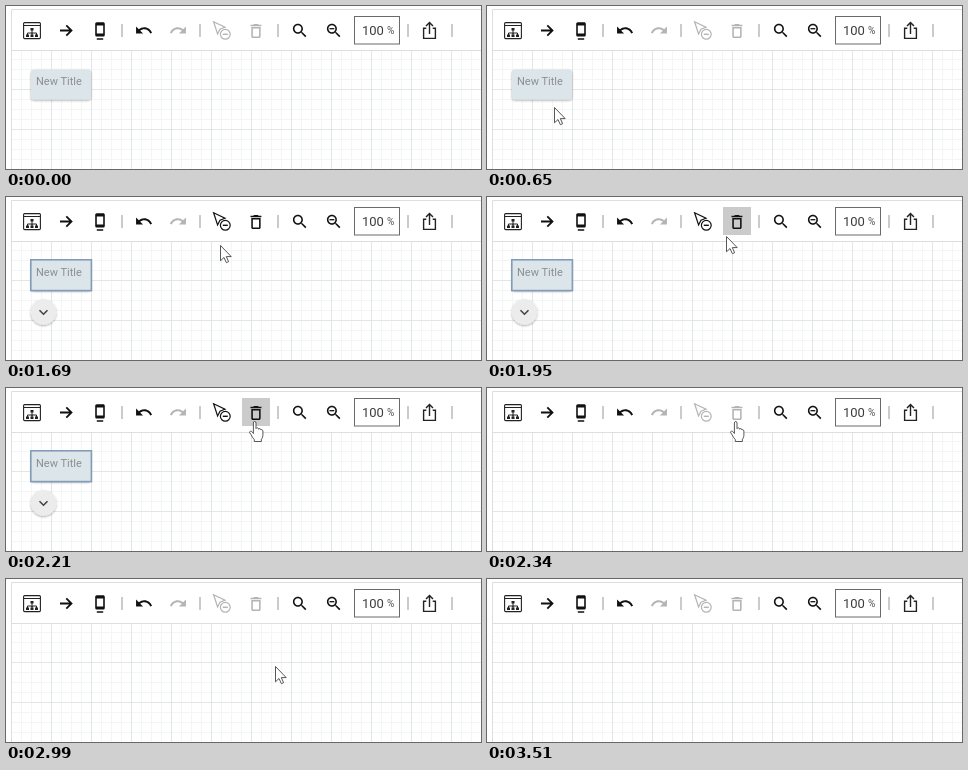
Animation, 475 px wide and 163 px high, one loop 4.42 s. Source, as an HTML page:

```html
<!DOCTYPE html>
<html lang="en">
<head>
<meta charset="utf-8">
<title>Diagram editor: delete a node</title>
<style>
  html, body { margin: 0; width: 100%; height: 100%; overflow: hidden; background: #fff; }
  svg { display: block; width: 475px; height: 163px; }
  text { font-family: Roboto, Arial, sans-serif; }
  .line { fill: none; stroke: #222; stroke-width: 1.3; }
  .tool { color: #111; }
  .off { color: #b4b4b4; }
</style>
</head>
<body>
<svg viewBox="0 0 475 163">
  <defs>
    <pattern id="minor" x="5" y="43" width="10" height="10" patternUnits="userSpaceOnUse">
      <path d="M.5 0V10M0 .5H10" stroke="#f4f5f5" fill="none"/>
    </pattern>
    <pattern id="major" x="5" y="43" width="40" height="40" patternUnits="userSpaceOnUse">
      <path d="M.5 0V40M0 .5H40" stroke="#e3e6e6" fill="none"/>
    </pattern>
    <filter id="shadow" x="-20%" y="-20%" width="140%" height="160%">
      <feDropShadow dx="0" dy="1" stdDeviation="1" flood-color="#000" flood-opacity=".35"/>
    </filter>
    <path id="undo" d="M12.5 8c-2.65 0-5.05.99-6.9 2.6L2 7v9h9l-3.62-3.62c1.39-1.16 3.16-1.88 5.12-1.88 3.54 0 6.55 2.31 7.6 5.5l2.37-.78C21.08 11.03 17.15 8 12.5 8z"/>
    <path id="lens" d="M15.5 14h-.79l-.28-.27C15.41 12.59 16 11.11 16 9.5 16 5.91 13.09 3 9.5 3S3 5.91 3 9.5 5.91 16 9.5 16c1.61 0 3.09-.59 4.23-1.57l.27.28v.79l5 4.99L20.49 19l-4.99-5zm-6 0C7.01 14 5 11.99 5 9.5S7.01 5 9.5 5 14 7.01 14 9.5 11.99 14 9.5 14z"/>
  </defs>

  <!-- canvas grid -->
  <rect x="5" y="45" width="470" height="118" fill="url(#minor)"/>
  <rect x="5" y="45" width="470" height="118" fill="url(#major)"/>

  <!-- toolbar -->
  <path d="M5.5 163V3.5H475M5 44.5H475" fill="none" stroke="#dedede"/>
  <path d="M116 18V31M194 18V31M272 18V31M402 18V31M446 18V31" stroke="#a9a9a9" stroke-width="1.2"/>
  <g class="line">
    <rect x="17.6" y="16.6" width="16.8" height="16" rx="1" stroke-width="1.1"/>
    <path d="M18 19.5H34" stroke-width="1"/>
    <path d="M26 24V28M21.5 29V27H30.5V29M26 27V29" stroke-width="1"/>
    <path d="M24.5 23.3H27.5M20 29.7H23M24.5 29.7H27.5M29 29.7H32" stroke-width="2.4"/>
    <path d="M54 24.5H65.4M60.3 19.3L65.5 24.5 60.3 29.7" stroke="#111" stroke-width="1.8"/>
    <path d="M420.3 22.3H417.6V32.4H429.4V22.3H426.7M423.5 28V16.5M420 20L423.5 16.4 427 20" stroke-width="1.4"/>
  </g>
  <path transform="translate(84.4 15.4) scale(.8)" fill="#111" d="M8 23h8v-2H8v2zm8-21.99L8 1c-1.1 0-2 .9-2 2v14c0 1.1.9 2 2 2h8c1.1 0 2-.9 2-2V3c0-1.1-.9-1.99-2-1.99zM16 15H8V5h8v10z"/>
  <use href="#undo" transform="translate(128.5 15) scale(.78)" fill="#111"/>
  <use href="#undo" transform="translate(181.5 15) scale(-.78 .78)" fill="#b4b4b4"/>

  <rect id="hover" x="236" y="10" width="28" height="28" fill="#cbcbcb"/>
  <g id="tools" class="tool">
    <g fill="none" stroke="currentColor" stroke-width="1.2">
      <path d="M207.6 15.8L219 21.2 214 23.2 211.6 28Z"/>
      <circle cx="219.3" cy="28.3" r="4.9"/>
      <path d="M216.8 28.3H221.8" stroke-width="1.4"/>
    </g>
    <path transform="translate(240.6 15.6) scale(.78)" fill="currentColor" d="M6 19c0 1.1.9 2 2 2h8c1.1 0 2-.9 2-2V7H6v12zM8 9h8v10H8V9zm7.5-5l-1-1h-5l-1 1H5v2h14V4z"/>
  </g>

  <use href="#lens" transform="translate(284.6 15.4) scale(.77)" fill="#111"/>
  <use href="#lens" transform="translate(318.6 15.4) scale(.77)" fill="#111"/>
  <path d="M323.5 22.7H328.3" stroke="#111" stroke-width="1.3"/>
  <rect x="348.5" y="10.5" width="45" height="27.5" fill="#fff" stroke="#6a6a6a"/>
  <text x="356" y="29" font-size="13" fill="#3c3c3c">100</text>
  <text x="381" y="28" font-size="10" fill="#555">%</text>

  <!-- node -->
  <g id="node">
    <rect x="25" y="63.5" width="60" height="30" rx="3" fill="#dce5ea" filter="url(#shadow)"/>
    <rect id="frame" x="24.8" y="62.8" width="60.6" height="30.8" fill="none" stroke-width="1.6"/>
    <text x="30" y="79" font-size="11" fill="#8c8f91">New Title</text>
  </g>
  <g id="expander">
    <circle cx="37.5" cy="115" r="12.7" fill="#ececec" filter="url(#shadow)"/>
    <path d="M33.5 113.2L37.5 117.2 41.5 113.2" fill="none" stroke="#444" stroke-width="1.6"/>
  </g>

  <!-- pointers, tip at 0,0 -->
  <g fill="#fff" stroke="#444" stroke-width=".9" stroke-linejoin="round">
    <path id="arrow" d="M.5 .5V15.8L4 12.5 6.4 17.7 8.6 16.7 6.3 11.6H11.2Z"/>
    <path id="hand" d="M4.4 12.5V2Q4.4.5 5.7.5T7 2V7.6Q7.5 6.6 8.6 6.9T9.6 8.2Q10 7.4 11 7.7T12 9Q12.3 8.4 13 8.7T13.9 10V14.5Q13.9 16.5 12.4 18.3V20.5H5.3V18.6Q3.5 16.7 2 13.7L.7 11.7Q.3 10.5 1.5 10.2T3.2 11.2Z"/>
  </g>
</svg>
<script>
const STEP = 130, LOOP = 4420;
const SELECT = 1170, LEAVE = 1430, HOVER = 1820, HAND = 2080, REMOVE = 2340, ARROW = 2470;

// [time, x, y] of the pointer tip; each pose holds until the next
const path = [
  [260, 51, 150], [390, 54, 133], [520, 62, 113], [650, 67, 101], [780, 67, 95],
  [910, 67, 93], [1300, 72, 91], [1430, 110, 80], [1560, 165, 64], [1690, 214, 48],
  [1820, 236, 41], [1950, 239, 39], [2080, 242, 35], [2210, 243, 33],
  [2470, 247, 33], [2730, 250, 43], [2860, 260, 68], [2990, 269, 87],
  [3120, 272, 90], [3250, 273, 90], [3380, 280, 85]
];
const GONE = 3510;

const el = id => document.getElementById(id);
const [arrow, hand, node, frame, expander, hover, tools] =
  ["arrow", "hand", "node", "frame", "expander", "hover", "tools"].map(el);
const show = (item, on) => item.style.visibility = on ? "visible" : "hidden";

function draw(now) {
  const t = Math.floor((now % LOOP) / STEP) * STEP;
  const selected = t >= SELECT && t < REMOVE;
  const pose = path.filter(p => p[0] <= t).pop();
  const visible = pose && t < GONE;
  const pointing = t >= HAND && t < ARROW;

  show(node, t < REMOVE);
  show(frame, selected);
  frame.setAttribute("stroke", t < LEAVE ? "#6c93bb" : "#829cb8");
  show(expander, selected);
  show(hover, t >= HOVER && t < REMOVE);
  tools.setAttribute("class", selected ? "tool" : "off");

  show(arrow, visible && !pointing);
  show(hand, visible && pointing);
  if (pose) {
    const place = `translate(${pose[1]} ${pose[2]})`;
    arrow.setAttribute("transform", place);
    hand.setAttribute("transform", place);
  }
}

const start = performance.now();
function tick() {
  draw(performance.now() - start);
  requestAnimationFrame(tick);
}
draw(0);
requestAnimationFrame(tick);
</script>
</body>
</html>
```
